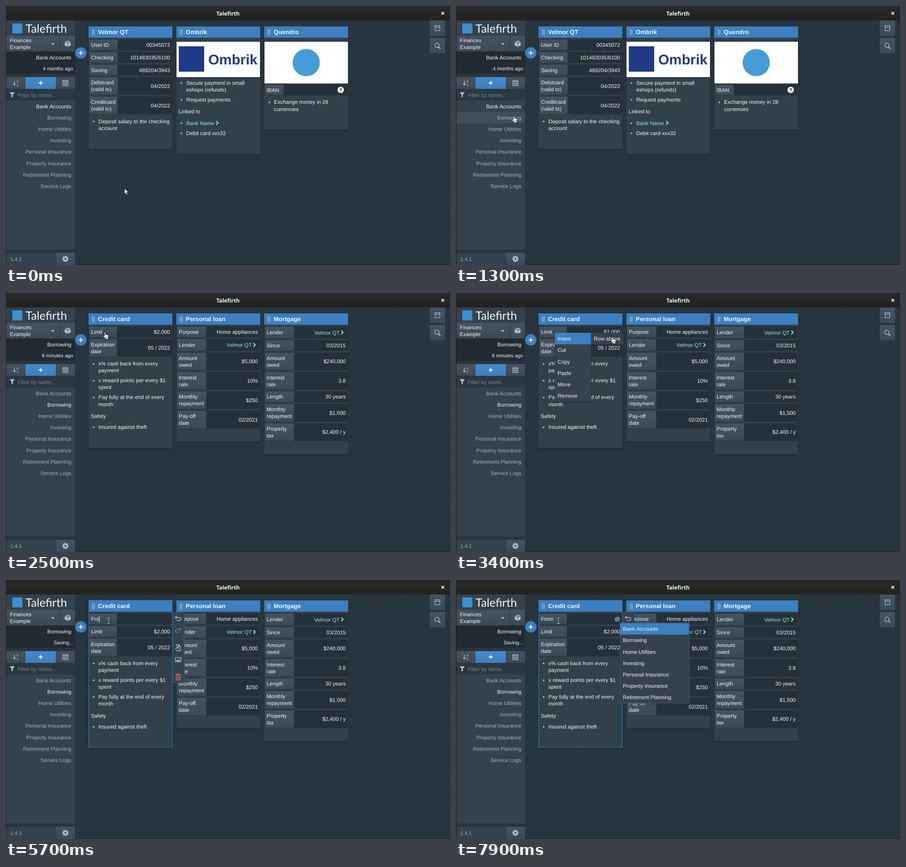
Write an HTML page that moves like this. It is 979 px wide and 572 px high and loops after 8 s.

```html
<!DOCTYPE html>
<html lang="en">
<head>
<meta charset="utf-8">
<title>Talefirth</title>
<style>
  html, body { margin: 0; width: 100%; height: 100%; overflow: hidden; background: #000; }
  svg { display: block; font-family: "Liberation Sans", Arial, sans-serif; text-rendering: geometricPrecision; }
</style>
</head>
<body>
<svg id="stage" width="979" height="572" viewBox="0 0 979 572"></svg>
<script>
const LOOP = 8000, SIZE = 11.76, ITEM = 25.2, SHIFT = 27.7;
const C = {
  text: '#f2f5f7', muted: '#a3b1bb', teal: '#92ead5', blue: '#3c80c1',
  card: '#323f4a', label: '#40505c', value: '#25313a', side: '#34424d', line: '#222d35', icon: '#b6c2cb'
};
const BANK = 'Velmor QT';
const PAGES = ['Bank Accounts', 'Borrowing', 'Home Utilities', 'Investing', 'Personal Insurance',
  'Property Insurance', 'Retirement Planning', 'Service Logs'];

const rect = (x, y, w, h, fill, more = '') =>
  `<rect x="${x}" y="${y}" width="${w}" height="${h}" fill="${fill}" ${more}/>`;
const circle = (x, y, r, fill, more = '') => `<circle cx="${x}" cy="${y}" r="${r}" fill="${fill}" ${more}/>`;
const shape = (d, fill, more = '') => `<path d="${d}" fill="${fill}" ${more}/>`;
const stroke = (d, color, width = 1.5, more = '') =>
  `<path d="${d}" fill="none" stroke="${color}" stroke-width="${width}" ${more}/>`;
const group = (id, body, more = '') => `<g id="${id}" ${more}>${body}</g>`;

// cy is the middle of the capital letters
function text(s, x, cy, { fill = C.text, anchor = 'start', size = SIZE, more = '' } = {}) {
  return `<text x="${x}" y="${cy + size * 0.355}" fill="${fill}" text-anchor="${anchor}" font-size="${size}" ${more}>${s}</text>`;
}
const right = (s, x, cy, fill) => text(s, x, cy, { anchor: 'end', fill });
const chevron = (x, y) => stroke(`M${x} ${y - 4}l4 4l-4 4`, C.teal, 2.1);

function lines(s, x, cy) {
  const parts = s.split('|');
  return parts.map((p, i) => text(p, x, cy + (i - (parts.length - 1) / 2) * 15.1)).join('');
}

// items: [first line centre, text]; a leading * makes a bullet
function notes(x, items) {
  return items.map(([y, s]) => s[0] === '*'
    ? circle(x + 11.2, y + 0.5, 1.7, C.teal) +
      s.slice(1).split('|').map((p, i) => text(p, x + 21.8, y + i * 15.1)).join('')
    : text(s, x + 5, y)).join('');
}

// rows: [label, value]; a leading > makes the value a link
function table(x, labelW, rows, y = 73.8) {
  return rows.map(([label, value]) => {
    const link = value[0] === '>';
    const h = label.includes('|') ? 39.5 : link ? 26.6 : 24.4, mid = y + h / 2;
    const out = rect(x + 1, y, 183, h, C.value) +
      rect(x + 1, y, labelW, h, 'url(#label)', `stroke="${C.line}" stroke-width=".7"`) +
      lines(label, x + 5.5, mid) +
      (link ? right(value.slice(1), x + 166.5, mid + 0.3, C.teal) + chevron(x + 170, mid)
            : right(value, x + 179.8, mid));
    y += h + 3.3;
    return out;
  }).join('');
}

function header(x, title) {
  let grip = '';
  for (let i = 0; i < 10; i++) grip += rect(x + 8.2 + (i % 2) * 3.4, 52 + (i >> 1) * 2.6, 1.6, 1.5, '#d5e4f2');
  return rect(x, 45, 185, 25, C.blue) + grip + text(title, x + 21, 57, { size: 13.3, more: 'font-weight="700"' });
}
const card = (x, bottom, title, body, id = '') =>
  rect(x, 45, 185, bottom - 45, C.card, `rx="1.5" filter="url(#soft)" ${id}`) + header(x, title) + body;

const accounts =
  card(182, 316, BANK,
    table(182, 63.5, [['User ID', '00345072'], ['Checking', '101483035/6100'], ['Saving', '489204/3943'],
      ['Debitcard|(valid to)', '04/2022'], ['Creditcard|(valid to)', '04/2022']]) +
    notes(182, [[254.5, '*Deposit salary to the checking|account']])) +
  card(375.6, 327, 'Ombrik',
    rect(376, 79, 184, 78, '#fff') + rect(381, 89, 56, 56, '#1f3a86') +
    text('Ombrik', 446, 118, { size: 31, fill: '#253b80', more: 'font-weight="700"' }) +
    notes(375.6, [[169.5, '*Secure payment in small|eshops (refunds)'], [206.5, '*Request payments'],
      [233.3, 'Linked to'], [280.5, '*Debit card xxx32']]) +
    circle(386.8, 259, 1.7, C.teal) + text('Bank Name', 397.4, 258.4, { fill: C.teal }) + chevron(463.5, 258.2)) +
  card(569.3, 273, 'Quendro',
    rect(570, 79, 184, 92, '#fff') + circle(662, 125, 30, '#479bd6') +
    table(569.3, 42.5, [['IBAN', '']], 173.2) + circle(738, 185.3, 7, '#fff') +
    text('?', 738, 185.4, { anchor: 'middle', fill: '#202a32', more: 'font-weight="700"' }) +
    notes(569.3, [[212.3, '*Exchange money in 28|currencies']]));

const credit =
  group('added', table(182, 62, [['', '']])) +
  group('creditBody',
    table(182, 62, [['Limit', '$2,000'], ['Expiration|date', '05 / 2022']]) +
    notes(182, [[156, '*x% cash back from every|payment'], [193.2, '*x reward points per every $1|spent'],
      [230.3, '*Pay fully at the end of every|month'], [272, 'Safety'], [296, '*Insured against theft']]));

const borrowing =
  card(182, 342, 'Credit card', credit, 'id="creditCard"') +
  card(375.6, 328, 'Personal loan',
    table(375.6, 65.3, [['Purpose', 'Home appliances'], ['Lender', '>' + BANK], ['Amount|owed', '$5,000'],
      ['Interest|rate', '10%'], ['Monthly|repayment', '$250'], ['Pay-off|date', '02/2021']])) +
  card(569.3, 356, 'Mortgage',
    table(569.3, 65.3, [['Lender', '>' + BANK], ['Since', '03/2015'], ['Amount|owed', '$240,000'],
      ['Interest|rate', '3.8'], ['Length', '30 years'], ['Monthly|repayment', '$1,500'],
      ['Property|tax', '$2,400 / y']]));

const gearTeeth = [...Array(8)].map((_, i) =>
  rect(129.6, 551.6, 2.8, 4, C.icon, `transform="rotate(${i * 45} 131 558.5)"`)).join('');

const sidebar =
  rect(1, 32, 151, 34, C.side) + rect(14, 38.5, 22, 22, '#3d8fd1') +
  text('Talefirth', 43, 50, { size: 25.5, more: 'font-family="Lato, sans-serif"' }) +
  rect(1, 66, 117, 34, 'url(#label)') + rect(119, 66, 33, 34, 'url(#label)') +
  lines('Finances|Example', 8.5, 83.4) + shape('M99.5 82h7.6l-3.8 4.2z', C.icon) +
  shape('M136 76.5l6.5 3v7.5l-6.5 3.2l-6.5-3.2v-7.5z', C.icon) +
  stroke('M129.5 79.7l6.5 3l6.5-3M136 82.7v7.5M132.5 78l6.5 3', '#46545f', 1.1) +
  rect(1, 100.5, 151, 26, '#222a30') + rect(1, 127, 151, 23, '#222b33') +
  rect(1, 157, 42, 26, 'url(#label)') + rect(43, 157, 67, 26, 'url(#primary)') + rect(110.5, 157, 41.5, 26, 'url(#label)') +
  stroke('M18.5 165v9M15.8 171.5l2.7 3l2.7-3', C.icon, 1.4) +
  text('A', 25.5, 166.8, { size: 7.5, anchor: 'middle', fill: C.icon }) +
  text('Z', 25.5, 174, { size: 7.5, anchor: 'middle', fill: C.icon }) +
  stroke('M76.5 165.5v9M72 170h9', '#fff', 1.8) +
  rect(125.2, 165, 11.6, 11, 'none', `stroke="${C.icon}" stroke-width="1.2"`) +
  stroke('M125 167.5h12M128 163.5v3M134 163.5v3M125 171.8h12M129 168v8M133 168v8', C.icon, 1.1) +
  rect(1, 184, 151, 24, '#2b3842') + shape('M8 190.5h11.5l-4.3 5.2v4.5l-2.9 2v-6.5z', C.icon) +
  text('Filter by name...', 26, 196.4, { fill: '#74828d' }) +
  rect(1, 208.5, 151, 329, C.side) + rect(1, 234.2, 151, ITEM, '#404e59', 'id="hover"') +
  PAGES.map((p, i) => `<g class="page">${right(p, 144, 221.5 + i * ITEM, 'inherit')}</g>`).join('') +
  rect(1, 545, 109, 27, C.side) + rect(110.5, 545, 41.5, 27, 'url(#label)') +
  text('1.4.1', 9.5, 558.8, { fill: C.muted, size: 11.4 }) + gearTeeth +
  circle(131, 558.5, 3.7, 'none', `stroke="${C.icon}" stroke-width="3"`) +
  `<text id="current" x="144" y="118" fill="${C.text}" text-anchor="end" font-size="${SIZE}"></text>` +
  `<text id="age" x="148" y="141.8" fill="${C.text}" text-anchor="end" font-size="11"></text>`;

const frame =
  rect(0, 0, 979, 572, '#161b20') + rect(0, 0, 979, 34, 'url(#bar)', 'rx="7"') +
  rect(1, 32, 977, 539, '#293741') + rect(1, 32, 977, 539, 'url(#dots)') +
  text('Talefirth', 489.5, 16.4, { anchor: 'middle', size: 12.2, more: 'font-weight="700" font-family="Noto Sans, sans-serif"' }) +
  stroke('M960.3 13.3l5.6 5.6M965.9 13.3l-5.6 5.6', '#fff', 1.8);

const actions =
  circle(165, 103.6, 12.6, C.blue) + stroke('M165 98.8v9.6M160.2 103.6h9.6', '#fff', 1.8) +
  rect(934.5, 32, 33.5, 34, 'url(#label)') + rect(934.5, 70.5, 33.5, 34, 'url(#label)') +
  rect(946.2, 43.5, 10.4, 11, 'none', `stroke="${C.icon}" stroke-width="1.2"`) + stroke('M946 46.8h11', C.icon, 1.2) +
  circle(950.2, 86.8, 4.7, 'none', `stroke="${C.icon}" stroke-width="1.5"`) + stroke('M953.6 90.3l4.2 4.2', C.icon, 2.2);

const arrowBack = 'M376.6 79.5l-3.2 3.2l3.2 3.2M373.6 82.7h8.6a3.3 3.3 0 0 1 0 6.8h-5.8';
const tools =
  rect(367, 71, 26, 156, C.side, 'stroke="#3a6a96" stroke-width=".9" filter="url(#soft)"') +
  stroke(arrowBack, C.icon) +
  stroke(arrowBack, '#6d7a84', 1.5, 'transform="matrix(-1 0 0 1 759 26)"') +
  stroke('M375.6 146v-3h5.2l3.6 3.4v9.6h-8.8v-1M380.5 143v4h4M373.5 152.5l5.8-4M375.8 148.2h3.8v3.6', C.icon, 1.4) +
  rect(373.4, 171.2, 12.4, 9.4, 'none', `stroke="${C.icon}" stroke-width="1.2"`) +
  shape('M374.5 179.6l3.4-4.4l2.4 2.4l1.8-1.6l2.8 3.6z', C.icon) + circle(382.6, 173.8, 0.9, C.icon) +
  stroke('M373.6 209.8h12M377.4 209v-1.6h4.4v1.6M375.2 211.5v9h8.8v-9M378 212.5v6M381.2 212.5v6', '#f0705f', 1.4);

const menu = group('menu',
  rect(218, 88, 80, 152, C.side, 'filter="url(#soft)"') + group('pick', rect(218, 88, 80, ITEM, C.blue)) +
  ['Insert', 'Cut', 'Copy', 'Paste', 'Move', 'Remove'].map((s, i) => text(s, 224, 101 + i * ITEM)).join('') +
  group('submenu', rect(298, 88, 71, 26, C.side, 'filter="url(#soft)"') + text('Row above', 304, 101)));

const dropdown = group('dropdown',
  rect(361.5, 95, 152.5, 177, C.side, 'stroke="#56646f" stroke-width=".8" filter="url(#soft)"') +
  rect(362, 95.4, 151.5, ITEM, C.blue) +
  PAGES.slice(0, 7).map((p, i) => text(p, 368, 108 + i * ITEM)).join(''));

const beam = 'M-3-6.5h2.2L0-5.8L.8-6.5H3M-3 6.5h2.2L0 5.8L.8 6.5H3M0-6V6';
const cursors = {
  arrow: shape('M0 0v12.6l2.9-2.6l2.1 5l2.3-1l-2.1-4.8h4z', '#fff', 'stroke="#111" stroke-width=".9"'),
  hand: shape('M-1.4 8.6V1.2a1.3 1.3 0 0 1 2.6 0v3.6l5.2 1.2q1.4.4 1.3 2l-.7 4.2v2.6h-6.6v-1.6l-4.8-4.4q-.8-1.8 1.2-1.7z',
    '#fff', 'stroke="#111" stroke-width=".9"') + stroke('M1.4 9.2v2.8M3.4 9.2v2.8M5.4 9.2v2.8', '#222', 0.8),
  stop: circle(0, 0, 5.4, '#fff', 'stroke="#111" stroke-width="3.8"') +
    stroke('M-3.8 3.8L3.8-3.8', '#111', 3.4) + circle(0, 0, 5.4, 'none', 'stroke="#fff" stroke-width="1.4"') +
    stroke('M-3.8 3.8L3.8-3.8', '#fff', 1.3),
  beam: stroke(beam, '#111', 2.4) + stroke(beam, '#fff', 1)
};

const grad = (id, a, b) =>
  `<linearGradient id="${id}" x2="0" y2="1"><stop stop-color="${a}"/><stop offset="1" stop-color="${b}"/></linearGradient>`;

document.getElementById('stage').innerHTML =
  `<defs>${grad('label', '#44535f', '#3b4a56')}${grad('primary', '#4589cb', '#3c80c1')}${grad('bar', '#2a2a2a', '#212121')}
    <pattern id="dots" width="4.2" height="4.2" patternUnits="userSpaceOnUse">${circle(2.1, 2.1, 0.85, '#1c262e')}</pattern>
    <filter id="soft" x="-20%" y="-20%" width="140%" height="140%"><feDropShadow dx="0" dy="1" stdDeviation="1.6" flood-opacity=".4"/></filter></defs>` +
  frame + sidebar + group('accounts', accounts) + group('borrowing', borrowing) + actions +
  group('typing', `<text id="typed" x="187.5" y="90.1" font-size="${SIZE}" fill="${C.text}"></text>` +
    group('at', right('@', 361.8, 86))) +
  group('focus', rect(182.5, 45, 184, 324.5, 'none', `id="outline" stroke="${C.blue}"`) + header(182, 'Credit card') + tools) +
  dropdown + rect(0, 79, 1, 14, '#fff', 'id="caret"') + menu +
  Object.keys(cursors).map(k => group(k, cursors[k])).join('');

const $ = id => document.getElementById(id);
const show = (id, on) => $(id).setAttribute('display', on ? 'inline' : 'none');
const within = (t, a, b) => t >= a && t < b;

// latest entry whose time has been reached
const latest = (steps, t) => steps.filter(s => s[0] <= t).pop();

// pointer path: time, x, y
const path = [[0, 261, 402.5], [300, 261, 402.5], [1000, 128, 237], [1100, 128, 237], [1300, 127.5, 243],
  [1600, 128, 245], [2200, 218.5, 87], [2800, 218.5, 87], [3200, 272, 96], [3300, 272, 96],
  [3400, 345, 97], [3700, 345, 97], [4000, 226, 90], [LOOP, 226, 90]];
const pointers = [[0, 'arrow'], [900, 'hand'], [1500, 'stop'], [1700, 'hand'], [1800, 'arrow'],
  [2200, 'hand'], [4000, 'beam']];
const words = [[0, ''], [5200, 'F'], [5700, 'Fro'], [5900, 'From']];
const carets = [[0, 0], [4200, 188], [4800, 0], [5200, 195], [5700, 205.2], [5900, 215.2],
  [6400, 361], [7000, 0], [7300, 361], [7900, 0]];
const hovers = [[0, 0, 0], [900, 2, 1], [1000, 1, 0], [1200, 1, 0.5], [1300, 1, 1], [1500, 1, 0]];
const menuSteps = [[0, 0, 1], [2900, 0.3, 0.6], [3000, 0.7, 0.85], [3100, 0.9, 0.96], [3200, 1, 1],
  [3800, 0.7, 1], [3900, 0.3, 1], [4000, 0, 1]];

function pointerAt(t) {
  const i = path.findIndex(p => p[0] > t), [t0, x0, y0] = path[i - 1], [t1, x1, y1] = path[i];
  const k = (t - t0) / (t1 - t0);
  return [x0 + (x1 - x0) * k, y0 + (y1 - y0) * k];
}

function draw(now) {
  const t = Math.floor(now % LOOP / 100) * 100;
  const page = t < 1500 ? 0 : 1, added = t >= 3600;

  show('accounts', page === 0);
  show('borrowing', page === 1);
  $('current').textContent = PAGES[page];
  $('age').textContent = added ? 'Saving...' : page ? '8 minutes ago' : '4 months ago';
  document.querySelectorAll('.page').forEach((g, i) => g.setAttribute('fill', i === page ? C.text : C.muted));

  const [, row, glow] = latest(hovers, t);
  $('hover').setAttribute('y', 208.9 + row * ITEM);
  $('hover').setAttribute('opacity', glow);

  show('added', added);
  $('creditBody').setAttribute('transform', `translate(0 ${added ? SHIFT : 0})`);
  $('creditCard').setAttribute('height', 297 + (added ? SHIFT : 0));
  $('outline').setAttribute('height', 296.5 + (added ? SHIFT : 0));
  show('focus', within(t, 2400, 2500) || t >= 4200);

  $('typed').textContent = latest(words, t)[1];
  show('at', t >= 7300);
  show('dropdown', t >= 7300);
  const caretX = latest(carets, t)[1];
  show('caret', caretX > 0);
  $('caret').setAttribute('x', caretX);

  const [, alpha, scale] = latest(menuSteps, t);
  $('menu').setAttribute('opacity', alpha);
  $('menu').setAttribute('transform', `translate(218 88) scale(${scale}) translate(-218 -88)`);
  show('pick', t >= 3200);
  show('submenu', t >= 3400);

  const kind = latest(pointers, t)[1], [x, y] = pointerAt(t);
  for (const k in cursors) show(k, k === kind);
  $(kind).setAttribute('transform', `translate(${x} ${y})`);
}

function tick() {
  draw(performance.now());
  requestAnimationFrame(tick);
}
tick();
</script>
</body>
</html>
```
